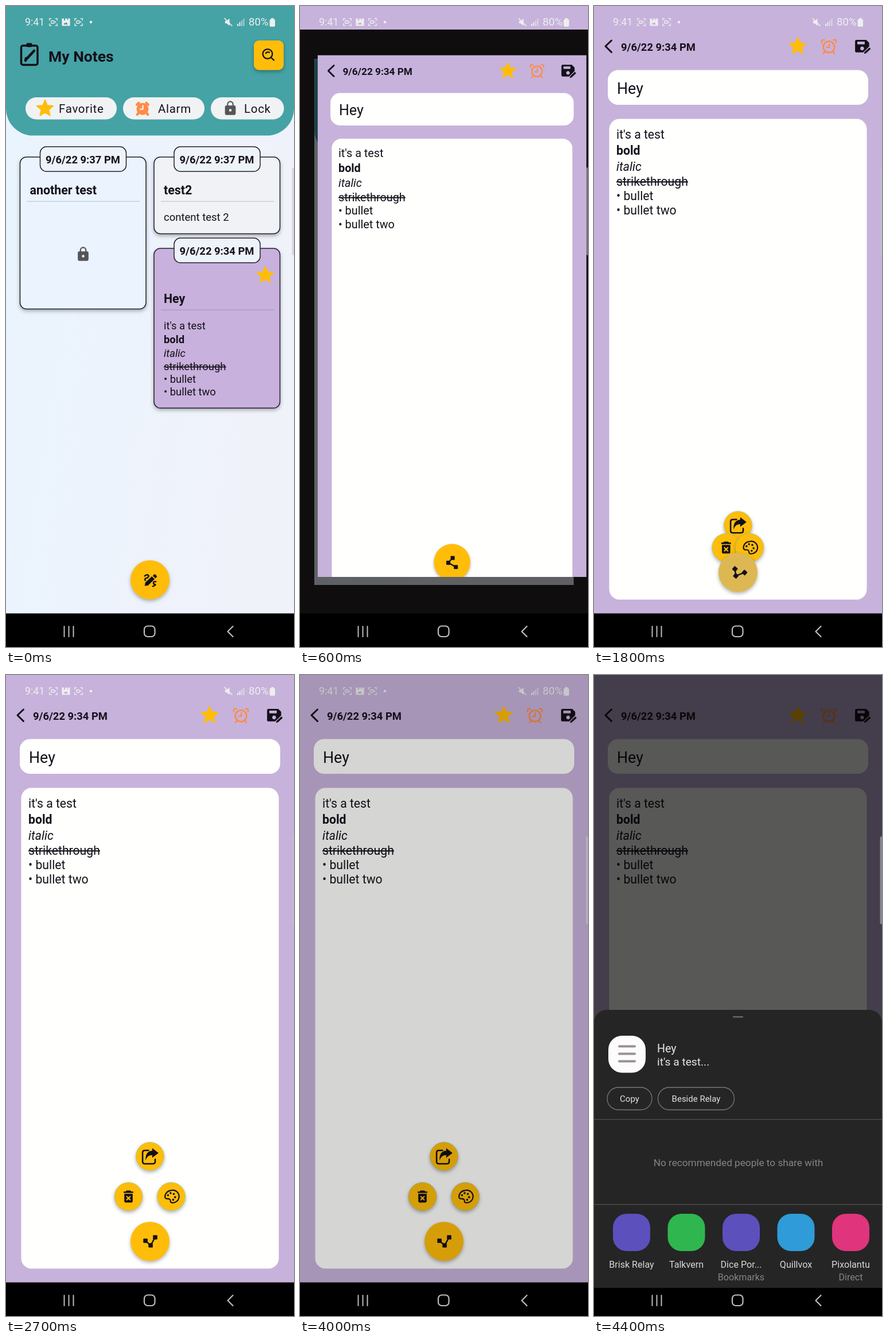
An HTML page for the animation above (4500 ms loop, 502 px wide and 1116 px high).

```html
<!DOCTYPE html>
<html lang="en">
<head>
<meta charset="utf-8">
<title>Notes app</title>
<style>
  html, body { margin: 0; height: 100%; overflow: hidden; background: #000; }
  svg { display: block; width: 502px; height: 1116px; font-family: Roboto, sans-serif; }
  .shadow { filter: drop-shadow(0 3px 3px rgba(0, 0, 0, .3)); }
  .line { fill: none; stroke-linecap: round; stroke-linejoin: round; }
  .b { font-weight: 700; }
  .i { font-style: italic; }
  .s { text-decoration: line-through; }
</style>
</head>
<body>
<svg id="stage" viewBox="0 0 502 1116"></svg>
<script>
const AMBER = '#ffbd0a', PURPLE = '#c7b2db', INK = '#14101a', ORANGE = '#ff8b45';

const rect = (x, y, w, h, r, fill, extra = '') =>
  `<rect x="${x}" y="${y}" width="${w}" height="${h}" rx="${r}" fill="${fill}" ${extra}/>`;
const circle = (x, y, r, fill, extra = '') =>
  `<circle cx="${x}" cy="${y}" r="${r}" fill="${fill}" ${extra}/>`;
const text = (x, y, size, str, fill = INK, extra = '') =>
  `<text x="${x}" y="${y}" font-size="${size}" fill="${fill}" ${extra}>${str}</text>`;
const middle = (x, y, size, str, fill) => text(x, y, size, str, fill, 'text-anchor="middle"');
const line = (d, width, color = INK) =>
  `<path class="line" d="${d}" stroke="${color}" stroke-width="${width}"/>`;
const shape = (d, fill = INK, extra = '') => `<path d="${d}" fill="${fill}" fill-rule="evenodd" ${extra}/>`;
const group = (content, attrs = '') => `<g ${attrs}>${content}</g>`;

// Icons live on a 24-unit grid.
const icons = {
  star: shape('M12 17.3 18.2 21 16.5 14 22 9.2 14.8 8.6 12 2 9.2 8.6 2 9.2 7.5 14 5.8 21z', AMBER,
    `stroke="${AMBER}" stroke-width="1.3" stroke-linejoin="round"`),
  lock: shape('M18 8h-1V6a5 5 0 0 0-10 0v2H6a2 2 0 0 0-2 2v10a2 2 0 0 0 2 2h12a2 2 0 0 0 2-2V10a2 2 0 0 0-2-2z' +
    'M12 17a2 2 0 1 1 0-4 2 2 0 0 1 0 4zM15.1 8H8.9V6a3.1 3.1 0 0 1 6.2 0z', '#555'),
  alarm: circle(12, 13, 7.6, 'none', `stroke="${ORANGE}" stroke-width="2"`) +
    line('M12.5 9v4.5H9M6.5 19.5l-2 2.5M17.5 19.5l2 2.5M2.5 7Q1 2.5 6 3.5M21.5 7Q23 2.5 18 3.5', 1.8, ORANGE),
  alarmFull: circle(12, 13, 9, ORANGE) +
    line('M6 19l-2 2.5M18 19l2 2.5M3.5 6.5l3-2.5M20.5 6.5l-3-2.5', 3.6, ORANGE) +
    line('M12.5 8v5.5H8.5', 1.7, '#fff'),
  save: shape('M4 3h13l4 4v5l-8 8H4a2 2 0 0 1-2-2V5q0-2 2-2zM5 5.5v3.5h10V5.5zM11.5 12a2.6 2.6 0 1 0 .01 0z') +
    shape('M13.5 22.5l.8-3.200 7-6.500 2.400 2.400-7 6.500z', INK, `stroke="${PURPLE}" stroke-width=".8"`),
  trash: shape('M8.5 2h7l1 1.5H20v2.5H4V3.5h3.5zM5 7.5h14V20a2 2 0 0 1-2 2H7a2 2 0 0 1-2-2z') +
    line('M9.2 12l5.6 5.6M14.8 12l-5.6 5.6', 2, AMBER),
  forward: line('M10 4H5Q2 4 2 7v12q0 3 3 3h11q3 0 3-3v-3', 2) +
    shape('M15 1l8.5 6.5L15 14v-3.5Q8.5 10 6 17.5 5.5 5 15 4.5z'),
  palette: line('M12 2.5a9.7 9.7 0 1 1 1 19c-3.5 0-1-4-3.5-5.5S3 17 2.3 13A10 10 0 0 1 12 2.5z', 1.9) +
    [[7, 10], [11, 6.7], [16, 8], [18, 13], [15, 17]].map(p => circle(...p, 1.6, INK)).join(''),
  share: line('M13 4.6L5.5 13l13 7.3', 2.2) +
    rect(9.5, 1.2, 7, 7, 1, INK) + rect(2, 9.5, 7, 7, 1, INK) + rect(15, 16.8, 7, 7, 1, INK),
  pen: shape('M3 21l1-5.5L14.5 5.5l4.5 4.5L8.5 20zM16 4.5l2-2q1-.8 2 0l2.2 2.2q.8 1 0 2l-2 2z') +
    line('M3 5q3-3 5.5-1.5T7 8q-5 1-3 4M21 14q-4-.5-4 2t3 2.5q1 1.5-4 3', 2.2),
  search: circle(11, 10.5, 8, 'none', `stroke="${INK}" stroke-width="2.2"`) +
    line('M17 16.5l4.5 4.5M8 9.5q2-3.5 6-1.5', 2.2),
  record: line('M3 8V4h4M17 4h4v4M21 16v4h-4M7 20H3v-4', 1.8, '#eee') +
    rect(7, 9, 7, 6, 1, 'none', 'stroke="#eee" stroke-width="1.7"') + shape('M15 12l3-2.5v5z', '#eee'),
  picture: shape('M2 3h5v5h3V3h5v4h2V3h5v18H2zM6 18h11l-4-6-3 3-1-2z', '#eee'),
  mute: shape('M4 9h4l7-6v18l-7-6H4z', '#eee') + line('M3 3l18 18', 2.2, '#eee')
};
const icon = (name, x, y, size) =>
  group(icons[name], `transform="translate(${x - size / 2} ${y - size / 2}) scale(${size / 24})"`);

const date = (x, y, minute) => text(x, y, 18.4, `9/6/22 9:${minute} PM`, INK, 'class="b"');

function richNote(x, y, size) {
  const lines = [["it's a test", ''], ['bold', 'b'], ['italic', 'i'], ['strikethrough', 's'], ['• bullet', ''], ['• bullet two', '']];
  const tops = [0, 1.31, 2.625, 3.865, 5.05, 6.24];
  return lines.map(([str, cls], k) => text(x, y + tops[k] * size, size, str, INK, `class="${cls}"`)).join('');
}

function card(x, y, h, fill, minute, title, titleY) {
  const edge = 'stroke="#20222c" stroke-width="1.5"';
  return group(rect(x, y, 219.5, h, 11, fill, edge), 'class="shadow"') +
    rect(x + 35, y - 18, 150, 43, 11, '#eef2f9', edge) + date(x + 44.5, y + 10.5, minute) +
    text(x + 17, titleY, 21.4, title, INK, 'class="b"') +
    rect(x + 12, titleY + 12, 197, 1.5, 0, 'rgba(90,100,120,.25)');
}

function chip(x, w, name, size, label, textX) {
  return rect(x, 159, w, 38.5, 19, '#f1f2f4') + icon(name, x + 34, 178, size) +
    text(textX, 185.5, 20.5, label, INK, 'letter-spacing=".7"');
}

const home =
  rect(0, 0, 502, 1058, 0, 'url(#paper)') +
  shape('M0 0H502V178a47 47 0 0 1-47 47.5H47a47 47 0 0 1-47-47.5z', '#45a3a5') +
  rect(26.5, 69, 28.5, 33.5, 3, 'none', `stroke="${INK}" stroke-width="3.5"`) +
  rect(35.5, 64.5, 10, 7, 2, INK) + line('M34 95l1-4M36 92L49 78', 4.5) +
  text(74, 96.5, 26.5, 'My Notes', INK, 'class="b"') +
  group(rect(432, 60, 52, 51.5, 9, AMBER), 'class="shadow"') + icon('search', 457, 85, 25) +
  chip(34, 159, 'star', 34, 'Favorite', 92) +
  chip(204, 142, 'alarmFull', 28, 'Alarm', 265) +
  chip(357, 127.5, 'lock', 28, 'Lock', 415) +
  card(24.5, 263, 264.5, '#eaf3fe', 37, 'another test', 327.5) + icon('lock', 134.5, 432, 28) +
  card(258, 263, 133.5, '#f0f2f6', 37, 'test2', 327.5) + text(275, 374, 18.5, 'content test 2') +
  card(258, 422, 278, '#c8b1dc', 34, 'Hey', 516.5) + icon('star', 452, 468, 34) + richNote(275, 563, 18.4) +
  group(circle(251, 999, 34, AMBER), 'class="shadow"') + icon('pen', 251.5, 1000, 26);

const action = (name, size) =>
  group(circle(0, 0, 24.5, AMBER, 'stroke="#a3c98c" stroke-width=".8"'), 'class="shadow"') + icon(name, 0, 0, size);

const detail =
  rect(0, 0, 502, 1058, 0, PURPLE) +
  line('M30.5 60L20 70l10.5 10.5', 3) + date(47, 77.5, 34) +
  icon('star', 355, 69.5, 35) + icon('alarm', 409.5, 70, 31) + icon('save', 468, 70.5, 31) +
  rect(24, 111.5, 454, 60.5, 18, '#fffffd') + text(40, 153, 26.8, 'Hey') +
  rect(26.5, 196.5, 449, 837, 18, '#fffffd') + richNote(39, 231, 21.2) +
  group(action('forward', 31), 'class="action"') +
  group(action('trash', 25), 'class="action"') +
  group(action('palette', 27), 'class="action"') +
  group(circle(251, 986, 34, AMBER) + circle(251, 986, 34, '#aaafbe', 'id="press"'), 'class="shadow"') +
  group(icon('share', 0, 0, 26), 'id="share"');

const status =
  text(33, 34, 17.8, '9:41', '#eee') +
  icon('record', 82.5, 28, 18) + icon('picture', 104.5, 28, 17) + icon('record', 126.5, 28, 18) +
  circle(148, 28, 2.3, '#eee') + icon('mute', 387.5, 28, 17) +
  [0, 1, 2, 3].map(k => rect(403 + k * 3.5, 31 - k * 3, 2, 4 + k * 3, 0, '#eee', k > 1 ? 'opacity=".6"' : '')).join('') +
  text(423, 34, 18.6, '80%', '#eee') + rect(459.5, 23, 9.5, 13, 2, '#eee') + rect(462, 21, 4.5, 3, 1, '#eee');

const pill = (x, w, label) =>
  rect(x, 135, w, 39, 19.5, 'none', 'stroke="#777" stroke-width="1.3"') + middle(x + w / 2, 160, 15, label, '#e2e2e2');

const apps = [
  ['Brisk Relay', '#5c50bd'], ['Talkvern', '#2fb64f'], ['Dice Por...', '#5c50bd', 'Bookmarks'],
  ['Quillvox', '#2f9bd8'], ['Pixolantu', '#e0347c', 'Direct']
].map(([name, color, sub = ''], k) => {
  const x = 65.5 + k * 95.5;
  return rect(x - 32.5, 355, 65, 65, 24, color) + middle(x, 449, 16.1, name, '#d8d8d8') + middle(x, 471, 16.1, sub, '#858585');
}).join('');

const sheet =
  rect(0, 0, 502, 600, 22, '#252525') + rect(242, 11, 18, 2.5, 1, '#666') +
  rect(25, 45, 65, 64.5, 24, '#fcfcfc') +
  [63.5, 76.5, 89.5].map(y => line(`M44 ${y}H71`, 4, '#9b9090')).join('') +
  text(110, 73.5, 19.6, 'Hey', '#e6e6e6') + text(110, 96.5, 19.2, "it's a test...", '#e6e6e6') +
  pill(23, 78, 'Copy') + pill(111.5, 133, 'Beside Relay') +
  middle(251.5, 271.5, 17.2, 'No recommended people to share with', '#858585') +
  group(rect(0, 190, 502, 1.5, 0, '#4a4a4a') + rect(0, 338, 502, 1.5, 0, '#4a4a4a') + apps, 'id="apps"');

const nav = line('M101.5 1080V1098M109.5 1080V1098M117.5 1080V1098', 2, '#bcbcbc') +
  rect(241, 1079.5, 18.5, 18.5, 6, 'none', 'stroke="#bcbcbc" stroke-width="2.2"') +
  line('M395.5 1080l-9 9 9 9', 2.2, '#bcbcbc');

const stage = document.getElementById('stage');
stage.innerHTML =
  `<defs><linearGradient id="paper" x2="1" y2=".3"><stop stop-color="#e9f4fe"/><stop offset="1" stop-color="#f0f2fa"/></linearGradient>
   <clipPath id="window"><rect id="windowRect" y="41" width="502"/></clipPath>
   <clipPath id="body"><rect id="bodyRect" width="502"/></clipPath></defs>` +
  rect(0, 0, 502, 1116, 0, '#100d0e') +
  group(group(home + rect(0, 0, 502, 1058, 0, '#000', 'id="homeDim"'), 'clip-path="url(#body)"'), 'id="home"') +
  rect(0, 0, 502, 41, 0, PURPLE, 'id="statusBack"') +
  group(group(detail, 'clip-path="url(#window)"'), 'id="detail"') +
  group(status, 'id="status"') + rect(0, 1057.5, 502, 59, 0, '#000') +
  rect(0, 0, 502, 1116, 0, '#000', 'id="dim"') +
  rect(498.5, 281, 6, 153, 3, '#c4c4cc', 'opacity=".55"') +
  group(sheet, 'id="sheet"') + rect(0, 1067, 502, 49, 0, '#000', 'id="navBack"') + nav;

const $ = id => document.getElementById(id);
const set = (id, attr, value) => $(id).setAttribute(attr, value);
const show = (id, on) => set(id, 'visibility', on ? 'visible' : 'hidden');
const clamp = v => Math.max(0, Math.min(1, v));
const span = (t, from, to) => clamp((t - from) / (to - from));
const actions = [...document.querySelectorAll('.action')];
const targets = [[0, -148], [-37.5, -78], [37, -78]];

function render(t) {
  // The detail window grows out of the tapped card while home recedes.
  const opening = t >= 400;
  const grow = 1 - (1 - span(t, 392, 800)) ** 3;
  const scale = .44 + .56 * grow;
  const recede = span(t, 400, 600);
  const back = 1 - .1 * recede;
  set('home', 'transform', `translate(${251 * (1 - back)} ${558 * (1 - back)}) scale(${back})`);
  set('homeDim', 'opacity', .6 * recede);
  set('bodyRect', 'y', opening ? 41 : 0);
  set('bodyRect', 'height', opening ? 1017 : 1058);
  show('statusBack', opening);
  show('detail', opening);
  set('detail', 'opacity', span(t, 360, 480));
  set('detail', 'transform', `translate(${464 * (1 - scale)} ${718 * (1 - scale)}) scale(${scale})`);
  set('windowRect', 'height', 1017 - 378 * (1 - grow));

  // Floating menu.
  const open = (1 - Math.cos(Math.PI * span(t, 1640, 1940))) / 2;
  actions.forEach((el, k) => {
    const [dx, dy] = targets[k];
    el.setAttribute('transform', `translate(${251 + dx * open} ${986 + dy * open})`);
    el.setAttribute('visibility', opening && open > 0 ? 'visible' : 'hidden');
  });
  set('share', 'transform', `translate(251 986) rotate(${-90 * open})`);
  set('press', 'opacity', t < 1600 ? 0 : .4 * span(t, 2100, 1800));

  // Share sheet.
  const rise = 1 - (1 - span(t, 4000, 4400)) ** 1.46;
  set('dim', 'opacity', .655 * span(t, 3950, 4150));
  set('sheet', 'transform', `translate(0 ${1116 - 533 * rise})`);
  show('sheet', t >= 4000);
  show('apps', t >= 4300);
  show('navBack', t >= 4300);
  show('status', t < 4100);
}

// The picture advances ten times a second.
function tick() {
  render(Math.floor(performance.now() % 4500 / 100) * 100);
  requestAnimationFrame(tick);
}
tick();
</script>
</body>
</html>
```
